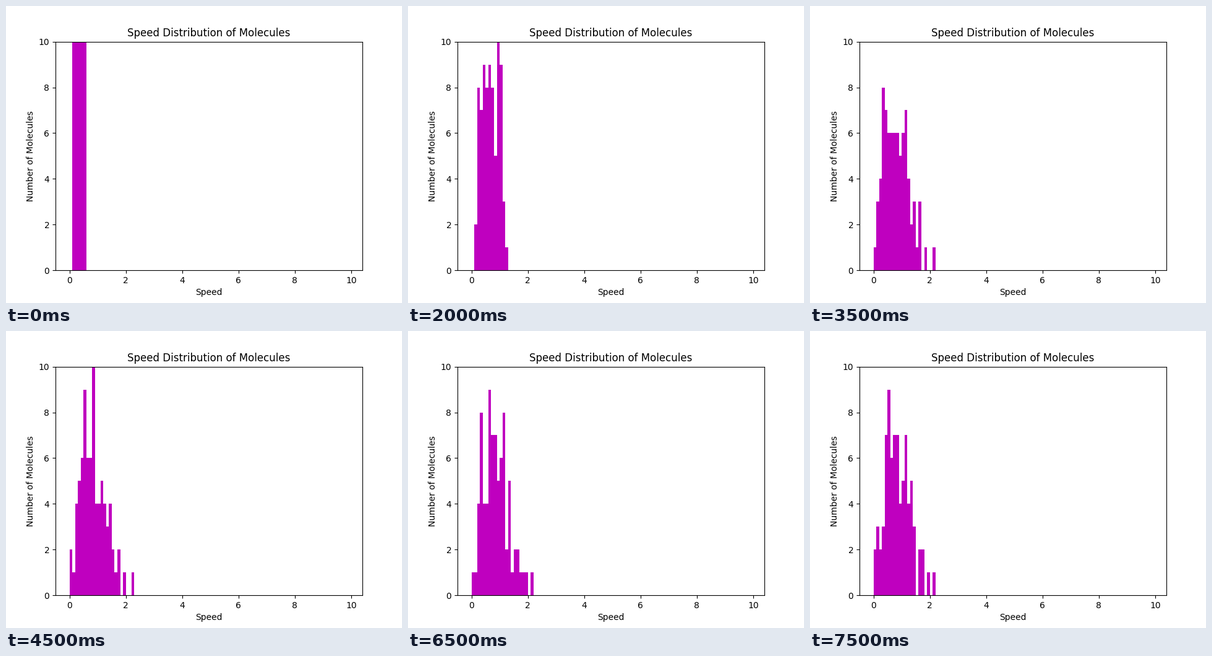
Recreate the animation shown at these times as a matplotlib script. Size 640x480 px, loop 8 s.

```python
import numpy as np
import matplotlib.pyplot as plt
from matplotlib.animation import FuncAnimation

STEPS = 16
MOLECULES = 80
WARM = 4      # steps in which the gas heats up
SETTLE = 4    # steps in which it then relaxes to a thermal spread
SIGMA = 0.69
JITTER = 0.06
EDGES = np.arange(0, 10, 0.1)
SPAN = EDGES[-1]

RANK = (np.arange(MOLECULES) + 0.5) / MOLECULES
START = 0.1 + 0.5 * RANK
THERMAL = SIGMA * np.sqrt(-2 * np.log(1 - RANK))


def smoothstep(x):
    x = np.clip(x, 0, 1)
    return x * x * (3 - 2 * x)


def speeds_at(step):
    """Even spread that heats up, then turns into a Rayleigh distribution."""
    warm = min(step / WARM, 1)
    mix = smoothstep((step - WARM) / SETTLE)
    base = (1 - mix) * START * (1 + 0.95 * warm**3) + mix * THERMAL
    noise = np.random.default_rng(step).normal(size=MOLECULES)
    return np.abs(base + JITTER * warm * noise)


def counts_at(step):
    return np.histogram(speeds_at(step), EDGES)[0]


plt.rcParams["text.kerning_factor"] = 6

fig, ax = plt.subplots(figsize=(6.4, 4.8), dpi=100)
bars = ax.bar(EDGES[:-1], counts_at(0), width=0.1, align="edge", color="m")
ax.set_xlim(-0.05 * SPAN, 1.05 * SPAN)
ax.set_ylim(0, 10)
ax.set_title("Speed Distribution of Molecules")
ax.set_xlabel("Speed")
ax.set_ylabel("Number of Molecules")


def update(step):
    for bar, n in zip(bars, counts_at(step)):
        bar.set_height(n)
    return list(bars)


anim = FuncAnimation(fig, update, frames=STEPS, interval=500,
                     repeat=True, repeat_delay=0)
plt.show()
```
